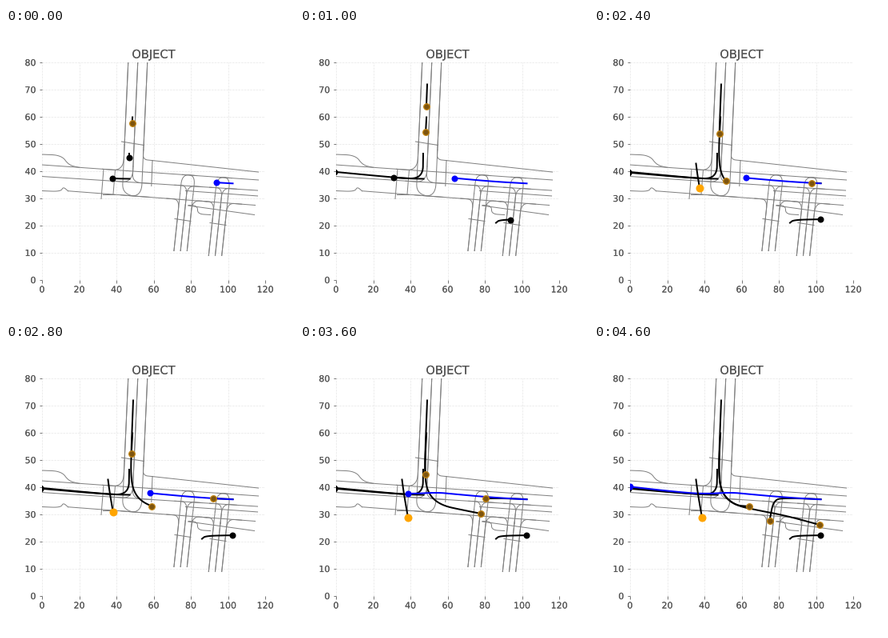
These frames come from a looping animation (360x360 px, 4700 ms). A matplotlib script:

```python
import numpy as np
import matplotlib.pyplot as plt
from matplotlib.animation import FuncAnimation
from matplotlib.patheffects import Normal

FRAMES, STEP = 47, 100
GRAY, TEXT = "#808080", "#555555"

plt.rcParams["font.family"] = "DejaVu Sans"
fig = plt.figure(figsize=(5, 5), dpi=72, facecolor="white")
ax = fig.add_axes([0.125, 0.125, 0.775, 0.755])
ax.set(xlim=(0, 120), ylim=(0, 80), xticks=range(0, 121, 20), yticks=range(0, 81, 10))
title = ax.set_title("OBJECT", fontsize=14.6, color=TEXT, pad=5.5)
ax.tick_params(length=3.5, width=0.8, color=TEXT, labelcolor=TEXT, labelsize=11, pad=4)
ax.grid(color="#e6e6e6", lw=0.7, ls="--")
ax.set_axisbelow(True)
for spine in ax.spines.values():
    spine.set_visible(False)

# lettering is printed twice, slightly apart
for text in [title, *ax.get_xticklabels(), *ax.get_yticklabels()]:
    text.set_path_effects([Normal(offset=(dx, dy)) for dx, dy in ((-0.8, 0.3), (0.8, -0.3))])


def to_data(px, py):
    """Stage pixels to axis units."""
    return (np.asarray(px) - 45.5) / 2.325, (314.5 - np.asarray(py)) / 3.3975


def lane(*points):
    ax.plot(*to_data(*np.transpose(points)), color=GRAY, lw=1, zorder=1.5)


def rounded(points, rounds=4):
    """Chaikin corner cutting with fixed ends."""
    p = np.array(points, float)
    for _ in range(rounds):
        a, b = p[:-1], p[1:]
        cut = np.stack([0.75 * a + 0.25 * b, 0.25 * a + 0.75 * b], 1).reshape(-1, 2)
        p = np.vstack([p[:1], cut, p[-1:]])
    return p


class Road:
    """Straight lane edge y = y0 + slope * (x - 45)."""

    def __init__(self, y0, slope, start, stop):
        self.y0, self.slope = y0, slope
        lane(self.at(start), self.at(stop))

    def at(self, x):
        return x, self.y0 + self.slope * (x - 45)


class Side:
    """Leaning side lane through (x, y), running out to the given end."""

    def __init__(self, x, y, end, lean):
        self.x, self.y, self.end, self.lean = x, y, end, lean

    def at(self, y):
        return self.x - self.lean * (y - self.y), y

    def join(self, road, reach, depth):
        """Turn from this lane into a road, starting depth pixels before it."""
        corner = self.at(road.at(self.x)[1])
        start = self.at(corner[1] + depth)
        lane(self.at(self.end), start)
        lane(*rounded([start, corner, road.at(corner[0] + reach)]))


roads = [Road(150, 0.109, 183, 316), Road(170.5, 0.07, 45, 316),
         Road(185, 0.065, 45, 315), Road(200.7, 0.076, 78, 312)]
Road(190, 0.072, 225, 315)
Road(196, 0.139, 228, 311)

# kerbs widening on the left
lane(*rounded([(45, 157.5), (70, 158.5), (79, 171), (92, 173.8)]))
lane(*rounded([(45, 203), (69, 204), (72, 198), (78, 203.2)]))

# northern junction
north = [Side(148.5 + 12 * i, 148, 43, 0.045) for i in range(3)]
for i, side in enumerate(north):
    side.join(roads[3 - i] if i < 2 else roads[0], 34 - 11 * i, -28 + 8 * i)
for side, road in zip(north, roads[1:]):
    side.join(road, -26, -32)
lane((145, 141.5), (173, 146))
lane((122.5, 176), (119.5, 213))
lane((137, 177), (134.5, 207))
lane((121, 207), (136, 207))
lane((183.5, 165), (182.3, 197))

# two southern junctions
for x, end in ((214.5, 278), (258.5, 284)):
    for i in range(3):
        side = Side(x + 8.2 * i, 240, end, 0.107)
        side.join(roads[3 - i], -16, 24)
        side.join(roads[1 + i], 18, 24)
    lane((x - 3, 238 + (x > 250) * 5), (x + 17, 241 + (x > 250) * 5))
lane(*rounded([(229, 221), (240, 222), (240, 232), (256, 233)]))


class Agent:
    """A dot driving along a rounded path, leaving a trail.

    Each stage is (start, stop, distance, power): progress u ** power.
    """

    def __init__(self, points, stages, color="black", edge=None, size=8, trail="black", z=3):
        p = rounded(points)
        self.s = np.r_[0, np.cumsum(np.hypot(*np.diff(p, axis=0).T))]
        self.x, self.y = to_data(*p.T)
        self.stages = stages
        self.path, = ax.plot([], [], color=trail, lw=2, zorder=z)
        self.dot, = ax.plot([], [], "o", color=color, ms=size, zorder=z + 2,
                            mec=edge or color, mew=1.3 if edge else 0)

    def travelled(self, n):
        done = sum(d * np.clip((n - a) / (b - a), 0, 1) ** p for a, b, d, p in self.stages)
        return self.s[-1] * done / sum(stage[2] for stage in self.stages)

    def update(self, n):
        if n < self.stages[0][0]:
            self.path.set_data([], [])
            self.dot.set_data([], [])
            return
        s = np.linspace(0, self.travelled(n), 120)
        x, y = np.interp(s, self.s, self.x), np.interp(s, self.s, self.y)
        self.path.set_data(x, y)
        self.dot.set_data(x[-1:], y[-1:])


RIDER = dict(color="#7d540f", edge="#c08210", size=7.6)
bend = [(156, 160), (160, 186), (176, 201)]

agents = [
    Agent([(155, 188), (133, 187.7), (43.5, 179.3)], [(-3, 9, 1, 1.2)]),
    Agent([(154.5, 156.5), (154, 188), (122, 187), (43.5, 180.2)], [(-2, 19, 1, 1.4)]),
    Agent([(245.5, 243), (250, 239.3), (283.5, 238.6)], [(2, 22, 1, 0.8)]),
    Agent([(158.6, 111), *bend, (206, 207.5), (240, 214), (282.5, 225.5)],
          [(-3, 10, 18.5, 0.6), (10, 46, 184.5, 1.15)], **RIDER),
    Agent([(159.5, 70), *bend, (194.5, 202.5)],
          [(3, 12, 31.5, 0.6), (17, 25, 33, 1), (27, 46, 87, 1.6)], **RIDER),
    Agent([(284, 193.5), (240, 192), (225, 194), (220, 220)], [(21, 46, 1, 0.95)], **RIDER),
    Agent([(284, 193.8), (243, 191.5), (192, 187), (172, 185), (137, 187), (100, 184),
           (45, 177.8)],
          [(-3, 10.5, 94, 1), (24, 46, 146, 1.6)], color="blue", trail="blue", z=3.5),
    Agent([(128, 169), (130.3, 186.5), (135.5, 216.3)], [(11, 31, 1, 1)],
          color="orange", size=10, z=4),
]


def draw(n):
    for agent in agents:
        agent.update(n)
    return [art for a in agents for art in (a.path, a.dot)]


anim = FuncAnimation(fig, draw, frames=FRAMES, interval=STEP, repeat=True,
                     repeat_delay=0, blit=False)
plt.show()
```
